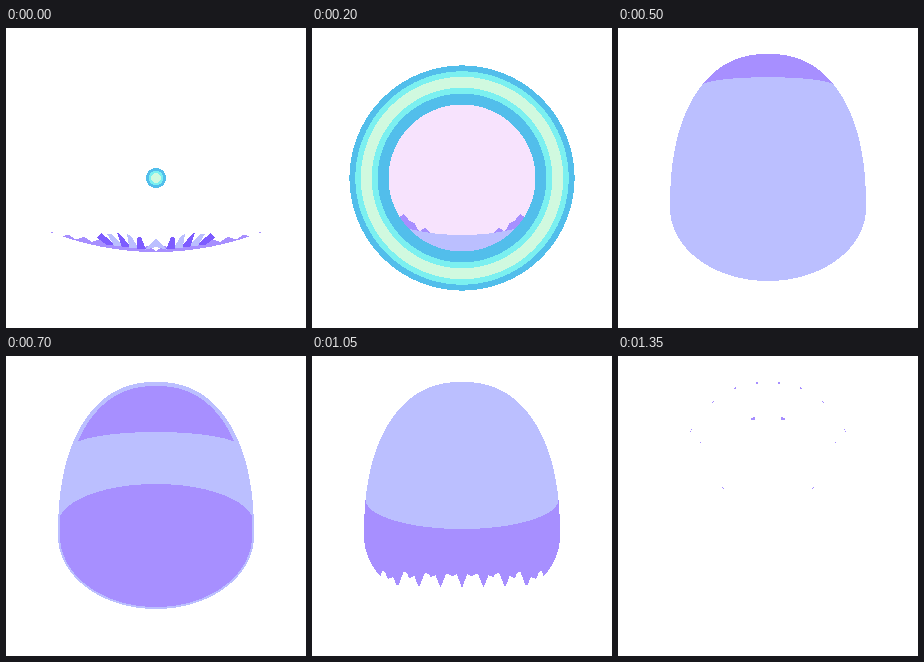
Write an HTML page with a canvas that moves like this. It is 300 px wide and 300 px high and loops after 1400 ms.

```html
<!DOCTYPE html>
<html lang="en">
<head>
<meta charset="utf-8">
<title>Crystal shield</title>
<style>
  html, body { margin: 0; width: 100%; height: 100%; overflow: hidden; background: #fff; }
  canvas { display: block; width: 100vmin; height: 100vmin; image-rendering: pixelated; }
</style>
</head>
<body>
<canvas id="stage" width="300" height="300"></canvas>
<script>
const SIZE = 300, MID = 150, STEP = 50, STEPS = 28;
const LIGHT = '#bbbfff', PURPLE = '#a78fff', DARK = '#7d5cff', LILAC = '#f7e3fd';
const BLUE = '#52beeb', CYAN = '#7bf0f0', PALE = '#d0f9df';
const ctx = document.getElementById('stage').getContext('2d');

// Shield: a superellipse above the waist, an ellipse below it
const WAIST = 180, WIDE = 98, UP = 154, DOWN = 73;
const arc = (v, p) => v < 1 ? (1 - v ** p) ** (1 / p) : 0;
const half = (y, inset = 0) => (WIDE - inset) *
  (y < WAIST ? arc((WAIST - y) / (UP - inset), 2.3) : arc((y - WAIST) / (DOWN - inset), 2));
const crown = dx => WAIST - UP * arc(dx / WIDE, 2.3);

const saw = v => Math.abs(v % 2 - 1);
const jag = dx => 12 * saw(dx / 11) + 8 * saw(dx / 5.3);

// Fills every pixel that passes the test, mirrored about the middle
function paint(color, test) {
  ctx.fillStyle = color;
  for (let y = 0; y < SIZE; y++) {
    let start = -1;
    for (let x = 0; x <= MID; x++) {
      const on = x < MID && test(x + 0.5, y + 0.5);
      if (on && start < 0) start = x;
      if (!on && start >= 0) {
        ctx.fillRect(MID + start, y, x - start, 1);
        ctx.fillRect(MID - x, y, x - start, 1);
        start = -1;
      }
    }
  }
}

// Hard-edged polygon with its mirror image; points are [distance from middle, y]
function poly(color, pts) {
  ctx.fillStyle = color;
  for (let y = 0; y < SIZE; y++) {
    const cuts = [], mid = y + 0.5;
    pts.forEach(([x0, y0], k) => {
      const [x1, y1] = pts[(k + 1) % pts.length];
      if (y0 <= mid !== y1 <= mid) cuts.push(Math.round(x0 + (x1 - x0) * (mid - y0) / (y1 - y0)));
    });
    cuts.sort((a, b) => a - b);
    for (let k = 0; k + 1 < cuts.length; k += 2) {
      const w = cuts[k + 1] - cuts[k];
      ctx.fillRect(MID + cuts[k], y, w, 1);
      ctx.fillRect(MID - cuts[k + 1], y, w, 1);
    }
  }
}

function shield(color, inset = 0, test = () => true) {
  paint(color, (dx, y) => dx < WIDE && dx < half(y, inset) && test(dx, y));
}

// Hoop around the shield: bowl-shaped when low, arched when high
function hoop(c, b = 9 - (c - 49) * 0.31) {
  const w = half(c + b) || WIDE;
  return dx => c + b * (1 - Math.sqrt(Math.max(0, 1 - (dx / w) ** 2)));
}
const below = edge => (dx, y) => y > edge(dx);
const above = edge => (dx, y) => y < edge(dx);

function crystals(f) {
  const base = 224;
  const put = (color, pts) => poly(color, pts.map(([x, y]) => [x * f, base + (y - base) * f]));
  paint(PURPLE, (dx, y) => {
    const u = dx / f, v = base + (y - base) / f;
    return v < base - 6 * (u / 58) ** 2 && v > 219 - u / 7 + 4 * saw(u / 8);
  });
  for (let i = 4; i >= 0; i--) {
    const tip = 19 + 10 * i, root = tip * 0.75, y = 221 - i;
    put(i % 2 ? LIGHT : DARK, [[tip, 204.5 + 1.3 * (i - 2) ** 2], [root + 5, y], [root - 4, y], [tip - 4, y - 12]]);
  }
  put(LIGHT, [[0, 211], [12, 222], [0, 219]]);
}

const BANDS = [[BLUE, 0, 0.15], [CYAN, 0.15, 0.29], [PALE, 0.29, 0.57], [CYAN, 0.57, 0.72], [BLUE, 0.72, 1]];

function ring(outer, hole) {
  for (const [color, a, b] of BANDS) {
    const hi = outer + (hole - outer) * a, lo = outer + (hole - outer) * b;
    paint(color, (dx, y) => {
      const r = Math.hypot(dx, y - MID);
      return r < hi && r >= lo;
    });
  }
}

function grow(n) {
  const u = n / 7;
  const outer = 10 + 134 * (1 - Math.max(0, 1 - u) ** 1.71), hole = 142.5 * u - 8;
  if (n < 6) paint(LILAC, (dx, y) => Math.hypot(dx, y - MID) < hole);
  if (n < 3) crystals(1 + n * 0.3);
  shield(PURPLE, 0, (dx, y) => y > 220 - 0.61 * dx - 45 * (n - 4) + jag(dx) / 2);
  shield(LIGHT, 0, below(hoop(207 - 26.3 * (n - 4))));
  if (u <= 1) ring(outer, hole);
}

// Two purple sheens close in, then light sinks from the top
function shine(n) {
  shield(LIGHT);
  if (n < 5) {
    const cap = 25 * n + 1;
    shield(PURPLE, 2, below(hoop(275 - 49 * n, 40)));
    shield(PURPLE, 4, above(hoop(cap, cap * 0.21)));
  } else {
    shield(PURPLE, 2.5, below(hoop(61 + 53 * (n - 6))));
  }
}

// Loose fragments: [distance from middle, y, half width, half height, lean]
const FRAGMENTS = [[34, 157, 11, 14, -8], [60, 171, 5, 7, 0], [67, 193, 3, 12, -7],
  [58, 193, 3, 12, -7], [56, 112, 6, 28, -1]];

// Back wall breaking up; f is the share of each piece that is left
function shards(f) {
  shield(PURPLE, 0, (dx, y) => {
    const left = f - (1 - f) * (1 - saw(dx / 11 + 1 - 1e-9 + (dx < 11 ? 0 : 0))) ;
    const thick = 29 + Math.max(0, dx - 62) * 1.6 * saw(dx / 5);
    return y - crown(dx) < thick * left;
  });
  shield(PURPLE, 0, (dx, y) => {
    const u = 14 + (dx - 14) / f, v = 60 + (y - 60) / f;
    const mass = u < 47 && v > 64 + 0.35 * u + 10 * saw(u / 9) && v < 124 - 0.3 * u - 9 * saw(u / 6 + 1);
    const drip = v > 110 && v < 150 && u < 5 - (v - 110) / 20;
    return u >= 0 && (mass || drip);
  });
  for (const [dx, y, w, h, lean] of FRAGMENTS) {
    const cx = dx + 12 * (1 - f), cy = y - 27 * (1 - f);
    poly(PURPLE, [[-lean, -h], [w, -h * 0.3], [lean, h], [-w, h * 0.3]]
      .map(([px, py]) => [cx + px * f * Math.sign(1), cy + py * f]));
  }
}

function shatter(n) {
  shield(PURPLE, 0, (dx, y) => y < 212 - 90 * n + jag(dx));
  if (n > 0) shards(1 - 0.23 * (n - 2));
  shield(LIGHT, 0, above(hoop(49 + 62 * (2 - n))));
}

let shown = -1;
function tick(now) {
  const n = Math.floor(now / STEP) % STEPS;
  if (n !== shown) {
    shown = n;
    ctx.clearRect(0, 0, SIZE, SIZE);
    if (n < 11) grow(n);
    else if (n < 21) shine(n - 11);
    else shatter(n - 21);
  }
  requestAnimationFrame(tick);
}
tick(0);
</script>
</body>
</html>
```
